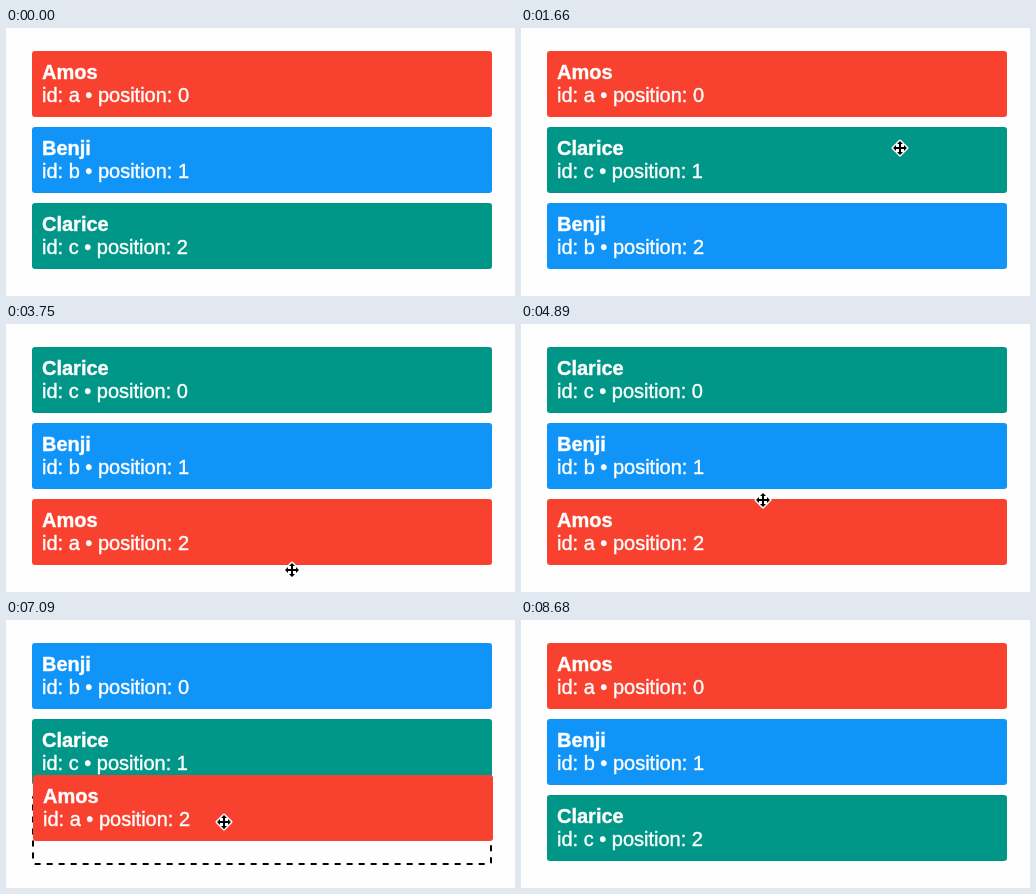
An HTML page with a canvas that plays this animation: 509 by 268 pixels, repeating every 9580 ms.

```html
<!DOCTYPE html>
<html lang="en">
<head>
<meta charset="utf-8">
<title>Sortable list</title>
<style>
  html, body { margin: 0; width: 100%; height: 100%; overflow: hidden; background: #fefefe; }
  canvas { display: block; width: 509px; height: 268px; }
</style>
</head>
<body>
<canvas id="stage"></canvas>
<script>
const W = 509, H = 268, LOOP = 9580, POLL = 87;
const LEFT = 26, TOP = 23, CARD_W = 460, CARD_H = 66, PITCH = 76, GAP_H = 70;
const FONT = '20px "Liberation Sans", Arial, sans-serif';

const people = [
  { id: 'a', name: 'Amos', color: '#f9412f' },
  { id: 'b', name: 'Benji', color: '#1094f7' },
  { id: 'c', name: 'Clarice', color: '#009788' }
];

// Pointer moves: first update, last update, end point.
const entry = { x: 510, y: 201 }, shown = 350, hidden = 8680;
const moves = [
  [350, 610, 375, 205],
  [960, 1480, 379, 120],
  [1930, 2362, 283, 68],
  [2448, 3580, 286, 247],
  [3750, 4190, 287, 233],
  [4370, 4720, 244, 182],
  [4890, 5153, 228, 135],
  [5241, 5680, 230, 59],
  [5940, 6120, 230, 45],
  [6300, 6820, 217, 222],
  [7000, 7610, 224, 61],
  [7700, 7790, 225, 50],
  [8320, 8590, 385, 144]
];

const drags = [
  { start: 960, end: 1660, from: 2 },
  { start: 2448, end: 3750, from: 0 },
  { start: 5241, end: 6300, from: 1 },
  { start: 7000, end: 8060, from: 2 }
];

const canvas = document.getElementById('stage');
const ctx = canvas.getContext('2d');
const ratio = window.devicePixelRatio || 1;
canvas.width = W * ratio;
canvas.height = H * ratio;

const mix = (a, b, p) => Math.round(a + (b - a) * p);

// The pointer is polled at a low rate, so each move advances in steps.
function pointerAt(t) {
  let at = entry;
  for (const [start, end, x, y] of moves) {
    if (t < start) break;
    const gaps = Math.round((end - start) / POLL);
    const k = Math.min(gaps, Math.floor((t - start) / (end - start) * gaps));
    const p = ((k + 1) / (gaps + 1)) ** 1.5;
    at = { x: mix(at.x, x, p), y: mix(at.y, y, p) };
  }
  return at;
}

// A neighbour gives way once the pointer passes its middle.
function slotFor(from, y) {
  let slot = 0;
  for (let k = 0; k < 2; k++) {
    const shift = k < from ? 0 : PITCH + GAP_H - CARD_H;
    if (y >= TOP + CARD_H / 2 + PITCH * k + shift) slot++;
  }
  return slot;
}

function shift(list, from, to) {
  const next = list.slice();
  next.splice(to, 0, next.splice(from, 1)[0]);
  return next;
}

function drawText(text, weight, x, y) {
  ctx.font = weight + ' ' + FONT;
  ctx.fillText(text, x, y);
  ctx.strokeText(text, x, y);
}

function drawCard(person, position, x, y) {
  ctx.fillStyle = person.color;
  ctx.beginPath();
  ctx.roundRect(x, y, CARD_W, CARD_H, 3);
  ctx.fill();
  ctx.fillStyle = ctx.strokeStyle = '#fff';
  ctx.lineWidth = 0.4;
  drawText(person.name, 'bold', x + 10, y + 28);
  drawText(`id: ${person.id} • position: ${position}`, 'normal', x + 10, y + 51);
}

function drawGap(y) {
  ctx.strokeStyle = '#000';
  ctx.lineWidth = 2;
  ctx.setLineDash([6, 6]);
  ctx.beginPath();
  ctx.roundRect(LEFT + 1, y + 1, CARD_W - 2, GAP_H - 2, 2);
  ctx.stroke();
  ctx.setLineDash([]);
}

function drawPointer({ x, y }) {
  const arm = [[-1, -1], [-1, -4], [-3, -4], [0, -7], [3, -4], [1, -4]];
  ctx.save();
  ctx.translate(x, y);
  ctx.beginPath();
  for (let q = 0; q < 4; q++) {
    const c = Math.round(Math.cos(q * Math.PI / 2)), s = Math.round(Math.sin(q * Math.PI / 2));
    for (const [px, py] of arm) ctx.lineTo(px * c - py * s, px * s + py * c);
  }
  ctx.closePath();
  ctx.strokeStyle = '#fff';
  ctx.lineWidth = 3;
  ctx.lineJoin = 'round';
  ctx.stroke();
  ctx.fillStyle = '#000';
  ctx.fill();
  ctx.restore();
}

function draw(t) {
  const pointer = pointerAt(t);
  let order = people, drag = null;
  for (const d of drags) {
    if (t >= d.end) order = shift(order, d.from, slotFor(d.from, pointerAt(d.end - 1).y));
    else if (t >= d.start) drag = d;
  }

  ctx.setTransform(ratio, 0, 0, ratio, 0, 0);
  ctx.fillStyle = '#fefefe';
  ctx.fillRect(0, 0, W, H);

  const held = drag && order[drag.from];
  const rows = drag ? shift(order, drag.from, slotFor(drag.from, pointer.y)) : order;
  let y = TOP;
  for (const person of rows) {
    if (person === held) {
      drawGap(y);
      y += GAP_H - CARD_H;
    } else {
      drawCard(person, order.indexOf(person), LEFT, y);
    }
    y += PITCH;
  }
  if (drag) {
    const grab = pointerAt(drag.start - 1);
    drawCard(held, drag.from, LEFT + pointer.x - grab.x, TOP + PITCH * drag.from + pointer.y - grab.y);
  }
  if (t >= shown && t < hidden) drawPointer(pointer);
}

const began = performance.now();
function tick() {
  draw((performance.now() - began) % LOOP);
  requestAnimationFrame(tick);
}
tick();
</script>
</body>
</html>
```
